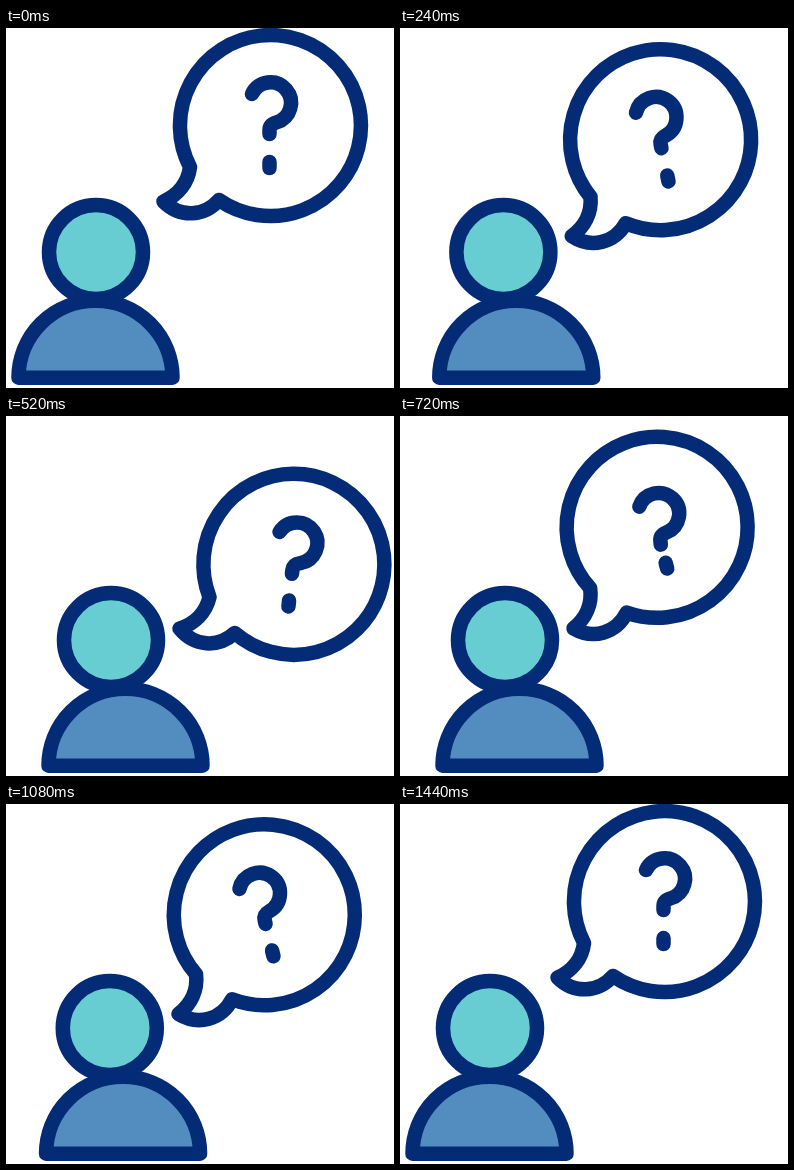
An HTML page for the animation above (1480 ms loop, 388 px wide and 360 px high).

```html
<!DOCTYPE html>
<html lang="en">
<head>
<meta charset="utf-8">
<title>Person with a question</title>
<style>
  html, body { margin: 0; width: 100%; height: 100%; overflow: hidden; background: #fff; }
  svg { display: block; width: 388px; height: 360px; }
  g { fill: none; stroke: #042b76; stroke-width: 14.5; stroke-linecap: round; stroke-linejoin: round; }
</style>
</head>
<body>
<svg viewBox="0 0 388 360">
  <g>
    <path id="body" fill="#538dc0" d="M12.5 349.7A77 77 0 0 1 166.5 349.7Z"/>
    <circle id="head" fill="#67cdd2" cx="90" cy="224" r="47"/>
  </g>
  <g id="bubble">
    <path fill="#fff" d="M184 139A90.5 90.5 0 1 1 213 172C198 189 174 190 157.5 173.5C172 167 182 155 184 139Z"/>
    <path id="hook" d="M246 66A20.5 20.5 0 1 1 270.5 94.4Q263.5 96.5 263.5 102V106"/>
    <path d="M263.5 134V140"/>
  </g>
</svg>
<script>
  const LOOP = 1480, STEP = 40;
  const [body, head, bubble, hook] =
    ['body', 'head', 'bubble', 'hook'].map(id => document.getElementById(id));

  // Cubic Bezier easing with handles (a, 0) and (b, 1), solved by bisection.
  function ease(t, from, to, a, b) {
    const u = (t - from) / (to - from);
    if (u <= 0) return 0;
    if (u >= 1) return 1;
    let lo = 0, hi = 1, s = 0.5;
    for (let i = 0; i < 24; i++) {
      s = (lo + hi) / 2;
      const r = 1 - s;
      const x = 3 * r * r * s * a + 3 * r * s * s * b + s * s * s;
      if (x < u) lo = s; else hi = s;
    }
    return s * s * (3 - 2 * s);
  }

  // Rises from 0 to 1 and falls back.
  const bump = (t, from, peak, to) =>
    ease(t, from, peak, 0.45, 0.55) - ease(t, peak, to, 0.45, 0.55);

  const move = (el, x, y, angle = 0, px = 0, py = 0) =>
    el.setAttribute('transform', `translate(${x} ${y}) rotate(${angle} ${px} ${py})`);

  function pose(t) {
    const enter = ease(t, 75, 358, 0.4, 0.1);
    const shift = enter - ease(t, 903, 1445, 0.85, 0.23);
    const follow = enter - ease(t, 924, 1458, 0.85, 0.23);
    const swing = bump(t, 180, 500, 690);
    const nod = bump(t, 440, 760, 1160);

    move(body, 30 * shift, 0);
    move(head, 15 * shift, 0);
    // The bubble pivots on the tip of its tail, the hook on its lower end.
    move(bubble, 16 * follow, 39 * follow, 21.5 * swing - 15 * shift, 157, 173.5);
    move(hook, 0, 9.5 * nod, 9.5 * nod, 263.5, 106);
  }

  function tick() {
    const t = performance.now() % LOOP;
    pose(Math.floor(t / STEP) * STEP);
    requestAnimationFrame(tick);
  }
  tick();
</script>
</body>
</html>
```
